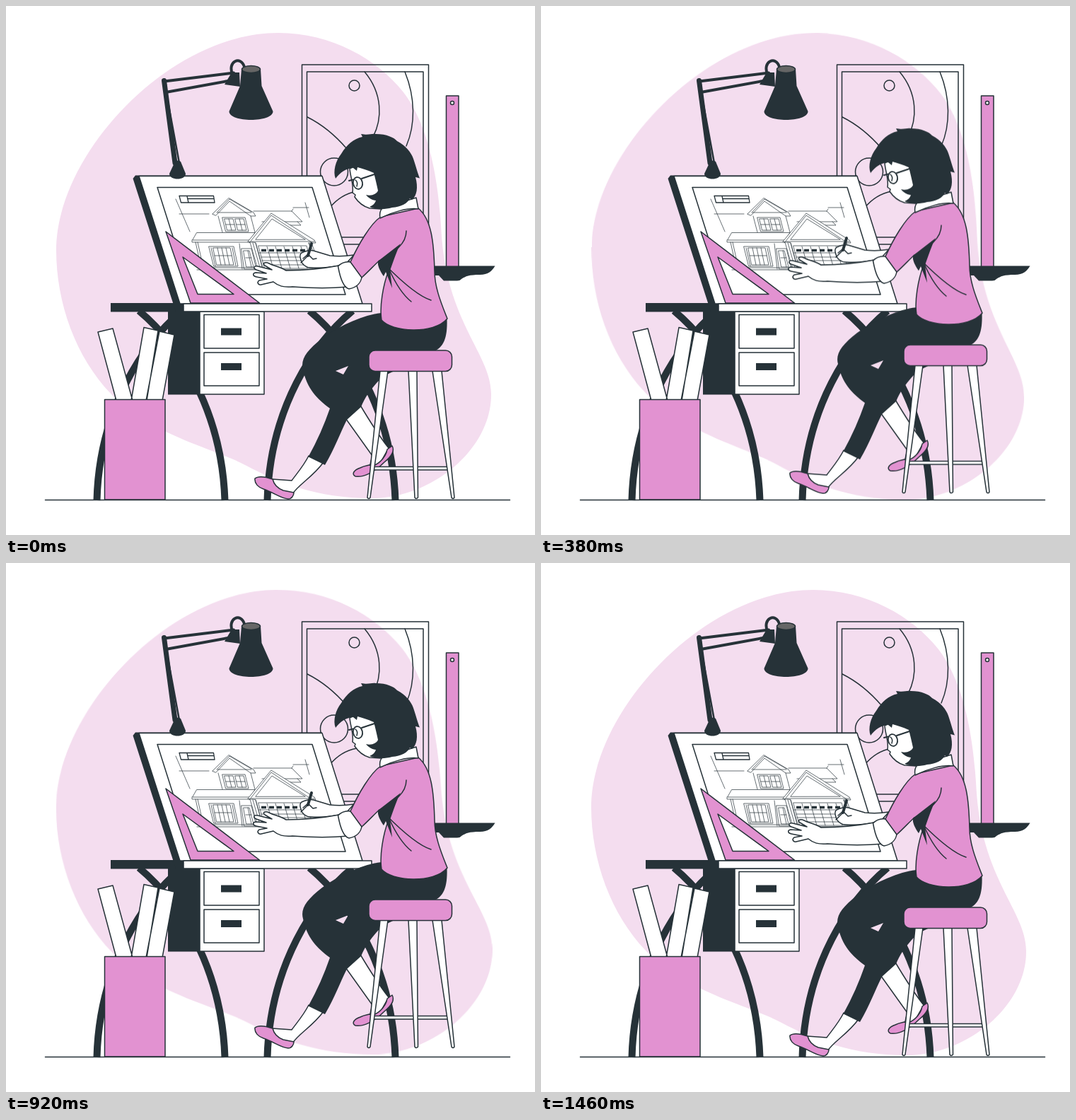
An HTML page that plays this animation: 748 by 748 pixels, repeating every 1500 ms.

```html
<!DOCTYPE html>
<html lang="en">
<head>
<meta charset="utf-8">
<title>Architect at the drawing board</title>
<style>
  html, body { margin: 0; width: 100%; height: 100%; overflow: hidden; background: #fff; }
  svg { display: block; width: 100%; height: 100%; }
  .line { fill: none; stroke: #263238; stroke-width: 1.5; stroke-linejoin: round; stroke-linecap: round; }
  .white { fill: #fff; }
  .pink { fill: #e292d1; }
  .dark { fill: #263238; stroke: none; }
  .thin { stroke-width: .7; }
  .bar { stroke-width: 10; stroke-linecap: butt; }
  #blob { fill: #f4ddef; transform-origin: 374px 374px; animation: rock 1.5s linear infinite; }
  #sitter { animation: lift 1.5s linear infinite; }
  /* Both cycles rest for the last 1/36 of the loop. */
  @keyframes lift {
    0%, 97.22%, 100% { transform: translateY(0); }
    48.61% { transform: translateY(-15px); }
  }
  @keyframes rock {
    0%, 97.22%, 100% { transform: rotate(0deg); }
    24.31% { transform: rotate(1deg); }
    72.92% { transform: rotate(-1deg); }
  }
</style>
</head>
<body>
<svg viewBox="0 0 748 748">
  <path id="blob" d="M385 38C460 38 525 75 562 122C600 172 611 250 615 310C618 372 630 412 653 460C671 497 686 520 686 550C686 625 605 696 516 696C440 696 385 674 340 650C300 629 258 621 200 588C120 545 71 445 71 345C71 210 230 38 385 38Z"/>

  <g id="picture" class="line">
    <path d="M418.5 83H597.5V337H418.5ZM425.5 93H590V327H425.5Z"/>
    <circle cx="492.500" cy="112.500" r="7.500"/>
    <circle cx="464" cy="234.500" r="19.500"/>
    <path d="M507 93C533 124 532 160 519 185M564 93C579 130 579 168 566 198M426 157C446 167 464 181 482 202M496 262C480 265 467 274 458 285"/>
  </g>

  <g id="ruler" class="line">
    <path class="pink" d="M622.500 127H640V369H622.500Z"/>
    <circle class="white" cx="631" cy="137" r="2.500"/>
    <path class="dark" d="M605 367.500H691.500C687 375 682 380 670 380C655 380 650 382 644 386Q642 388.500 638 388.500H619L612 381H605Z"/>
  </g>

  <g id="desk" class="line">
    <g id="legs" class="bar">
      <path d="M490 431C436 476 373 568 369.500 699"/>
      <path d="M429 431C483 476 546 568 550.500 699"/>
    </g>
    <use href="#legs" x="-241"/>
    <path class="dark" d="M148 420H252V432.500H148ZM229 430H275V549.500H229Z"/>
    <path class="white" d="M274 432H365V549H274ZM280 436.500H358V484H280ZM280 490H358V537H280Z"/>
    <path class="dark" d="M304 455.500H333V465.500H304ZM304 505H333V515H304Z"/>
    <path class="dark" d="M179.500 244L183 239.500H447V242L190 243L252 421V432H240Z"/>
    <path class="white" d="M188 240.500H447L504 421H246Z"/>
    <path class="white" d="M214 256.500H433L480 408H262Z"/>
    <path class="white" d="M251 421H517V432H251Z"/>
  </g>

  <g id="plan" class="line thin">
    <path d="M240 273L260 319M245 294H287M423 278L429 299M406 285H428"/>
    <path style="stroke-width:1.300" d="M245 268.500H293.500L295 278H247.500ZM256 269L258 278M256.500 272.500H294"/>
    <!-- upper storey -->
    <path d="M292 294L315 271.500L350 292L353 297L346 297L316 276L297 296ZM299 291L316 273L347 291M298 292H347M350 290H404L419 305H362M404 290L406 287M412 305L417 310H390M300 297L306 320M346 297L352 320"/>
    <path d="M306 299H338L343 319H311ZM309 301H321L325 317H313ZM324 301H336L340 317H328ZM315 301L319 317M330 301L334 317M311 309H323M326 309H338"/>
    <!-- left wing -->
    <path d="M270 320.500H352L345 331H264ZM263 331V334H345V331M271 334L279 370M268 334L276 370M279 370H356M330 336L334 372M345 334L356 372"/>
    <path d="M287 340H322L328 368H294ZM293 342H317L322 366H298ZM305 342L310 366M295 353H319M299 342L304 366M311 342L316 366M290 342L296 368M320 342L325 367"/>
    <path d="M333 343H347L354 372H337ZM336 346H344L350 369H340ZM339 356H347M342 346L347 369"/>
    <!-- garage -->
    <path class="white" d="M342 333L375 293L436 331L438 335H428L450 373H363L353 335Z"/>
    <path d="M344 335L375 296L432 334M353 330L376 301L423 330ZM347 333H436M353 335L364 373M428 335L441 373M349 335L360 373M432 335L446 373"/>
    <path d="M357 339H425L434 371H366ZM358 349H428M361 355H429M362 360H431M364 366H433M369 340L378 371M381 340L390 371M393 340L402 371M405 340L414 371M417 340L426 371"/>
    <path style="stroke-width:3.500;stroke-linecap:butt;stroke-dasharray:7 4" d="M361 345.500H427"/>
    <path d="M270 373H450"/>
  </g>

  <path id="square" class="line pink" fill-rule="evenodd" d="M226 319L358.500 420H261ZM250 355L271 407.500H322Z"/>

  <g id="lamp" class="line">
    <path style="stroke-width:4" d="M224 106.500L322 94.500M226 122L314 106"/>
    <path style="stroke-width:7" d="M223.500 105.500L239 222"/>
    <path style="stroke-width:2.500" d="M228 130L245 222"/>
    <path class="dark" d="M239 220Q243 217 247 220L254 237C254 247 231 247 231 237Z"/>
    <path style="stroke-width:4" d="M320 96C313 78 332 70 337 86"/>
    <path class="dark" d="M319 94L309 111L331 114L330 94Z"/>
    <path class="dark" d="M333 89H360L361.500 113L377.500 149C377.500 165 315.500 165 315.500 149L331 113Z"/>
    <ellipse cx="346.500" cy="89.500" rx="13" ry="5" style="fill:#666"/>
  </g>

  <g id="bin" class="line">
    <path class="white" d="M130 461L151 456L179 558H156ZM195 454.500L215 459L199 558H177ZM217 460L238 465L221 558H198Z"/>
    <path class="pink" d="M139.500 556.500H225V698H139.500Z"/>
  </g>

  <path class="line" d="M55.500 698.500H712.500"/>

  <g id="sitter" class="line">
    <!-- far leg -->
    <path class="white" d="M478 580L518 636L514 652L528 648L541 625Q525 605 500 563Z"/>
    <path class="pink" d="M546 622C550 629 545 637 535 645C520 660 505 667 494 665C488 662 492 656 501 653C507 650 511 650 514 649C522 653 537 640 539 627Z"/>
    <!-- near leg -->
    <path class="white" d="M428 636C421 650 412 660 404 671L376 669L384 686L405 690C414 676 434 666 449 645Z"/>
    <path class="pink" d="M352 668C357 664 368 666 377 669C379 677 384 682 392 685L407 688C407 692 404 697 399 697C388 696 379 688 364 683C357 681 351 675 352 668Z"/>
    <path class="dark" fill-rule="evenodd" d="M531 434C505 437 475 450 447 470C425 487 416 500 420 514C425 540 440 556 458 569C450 592 440 615 427.500 637.500L451 649C465 625 472 605 482 585L502 567C508 552 515 544 524 533C536 520 548 516 558 514L580 492C612 492 625 482 623.500 442ZM466 516L484 509L477 521Z"/>
    <!-- stool -->
    <path class="white" d="M517 651.500H627V656H517Z"/>
    <path class="white" d="M529 516H540L515 695Q513 698 511 695ZM569 516H581L582.500 695Q580 698 578 695ZM603 516H616L634 695Q632 698 630 695Z"/>
    <rect class="pink" x="513" y="487" width="117.500" height="29.500" rx="9"/>

    <!-- far arm and pencil -->
    <path class="white" d="M492 352C480 354 468 354 458 353L438 347C432 344 424 346 418 349C414 352 416 356 417 359C418 365 424 370 431 370C446 371 460 370 480 365Z"/>
    <path style="stroke-width:4" d="M432 336L427 353"/>
    <path d="M427 353L417 363M420 357L427 351L434 358L439 357"/>

    <!-- near arm -->
    <path class="white" d="M471 367C445 372 420 374 396 374C388 369 380 368 372 364C366 361 362 364 366 367L376 373L356 368C350 367 349 371 354 373L368 378L353 377C348 378 349 382 354 383L369 386L358 388C354 391 357 395 361 394L378 390C385 396 392 398 405 397C430 399 455 400 484 397Z"/>
    <path class="white" d="M469.500 368C475 362 482 361 488 362L503 383C502 392 495 398 485 400C477 398 472 382 469.500 368Z"/>

    <!-- shirt -->
    <path class="pink" d="M530 298C515 308 498 338 487 362L503 384C514 374 522 365 528 360L541 374C533 395 528 425 531 444C545 461 605 465 624 442C613 415 606 395 606 375C605 335 602 302 583 286Z"/>
    <path class="dark" d="M558 336L527 360C523 365 531 378 534 382L537 376L546 399L543 374C548 360 552 347 558 336Z"/>
    <path d="M527 361C550 347 566 337 566 318M542 373C552 395 563 410 573 418M538 368C568 398 588 412 601 416"/>
    <path class="white" d="M532 286L580 271L583 287C568 285 547 291 529 300C528 294 529 289 532 286Z"/>

    <!-- head -->
    <path class="white" d="M486 230C487 242 492 253 490 264L494 267L493 270C499 279 507 284 514 286L530 287L532 235L500 222Z"/>
    <path class="dark" d="M466 244C462 234 466 219 474 209C482 196 491 188 504 185L502 181C514 183 516 180 523 181C538 181 549 186 553 191C565 197 573 207 576 216C580 228 582 236 585 243.500L579 242C583 256 581 269 574 274L571 272C568 279 559 284 546 285C535 288 525 288 514 284C519 282 522 279 523 275C518 275 512 271 509 267C517 269 524 266 526 261C524 252 522 243 520 236C511 232 504 230 497 228L496 233L491 229C480 230 473 235 466 244Z"/>
    <ellipse style="stroke-width:1.800" cx="497.500" cy="250.500" rx="6.500" ry="8.500" transform="rotate(-12 497.500 250.500)"/>
    <path style="stroke-width:2" d="M485 247L491 245.500M503 244L521 238"/>
    <path d="M494 246Q498 249 496 255"/>
  </g>
</svg>
</body>
</html>
```
